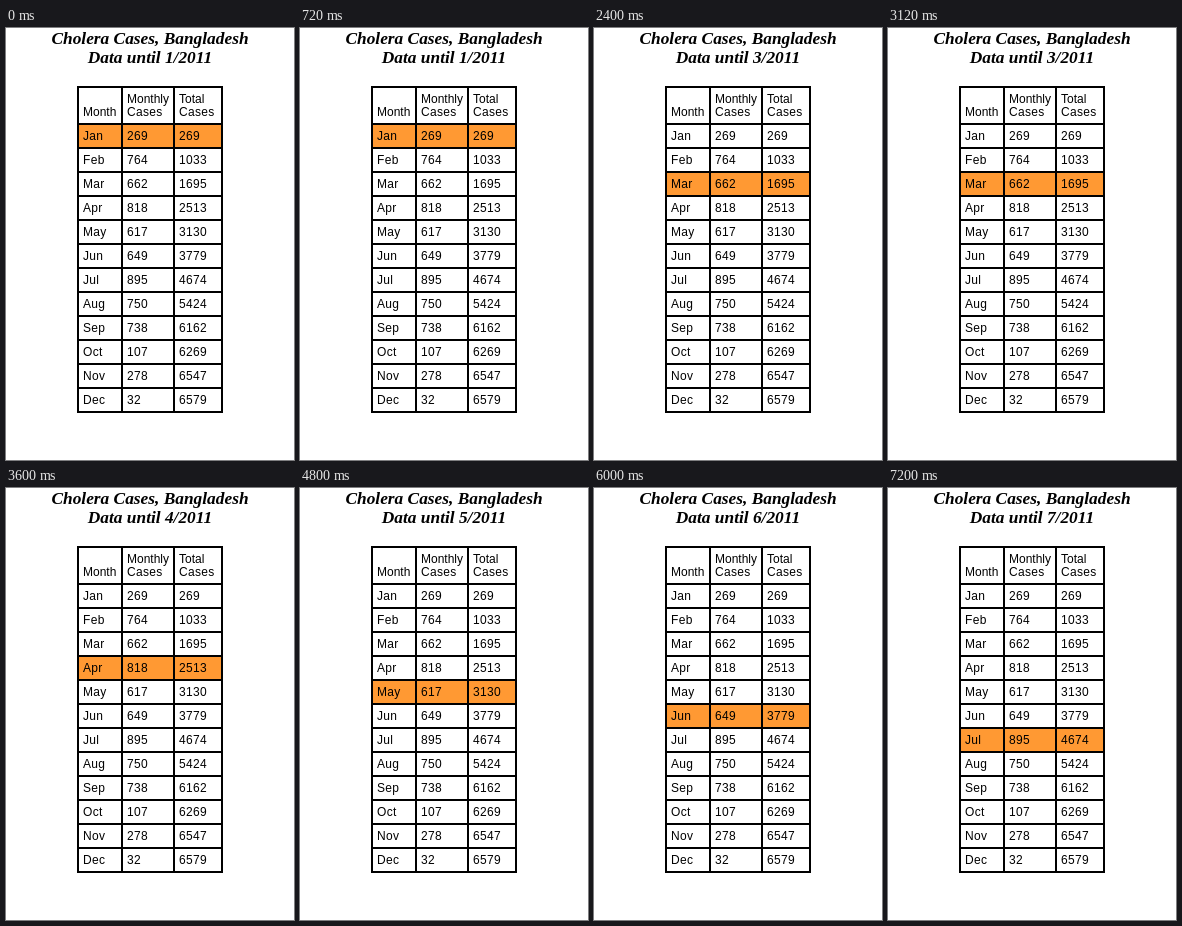
An HTML page that plays this animation: 288x432 px, repeating every 8 s.

```html
<!DOCTYPE html>
<html lang="en">
<head>
<meta charset="utf-8">
<title>Cholera Cases, Bangladesh</title>
<style>
  html, body { margin: 0; width: 100%; height: 100%; overflow: hidden; background: #fff; }
  svg { display: block; width: 100vw; height: 100vh; }
  .title { font: italic bold 17.35px "Liberation Serif", serif; text-anchor: middle; }
  .head { font: 12px "Liberation Sans", sans-serif; }
  .cell { font: 12px "Liberation Sans", sans-serif; letter-spacing: .33px; }
</style>
</head>
<body>
<svg id="stage" viewBox="0 0 288 432"></svg>
<script>
const LOOP = 8000, STEP = 1200;
const ROW_H = 24, FIRST_ROW = 96;
const COLS = [72, 116, 168, 216];
const MONTHS = "Jan Feb Mar Apr May Jun Jul Aug Sep Oct Nov Dec".split(" ");
const CASES = [269, 764, 662, 818, 617, 649, 895, 750, 738, 107, 278, 32];
const stage = document.getElementById("stage");

function add(tag, attrs, content = "") {
  const el = document.createElementNS("http://www.w3.org/2000/svg", tag);
  for (const key in attrs) el.setAttribute(key, attrs[key]);
  el.textContent = content;
  return stage.appendChild(el);
}

function label(x, y, kind, content) {
  return add("text", { x, y, class: kind }, content);
}

const bar = add("rect", { x: 72, width: 144, height: ROW_H, fill: "#ff9933" });

// Grid
const bottom = FIRST_ROW + ROW_H * MONTHS.length;
let grid = COLS.map(x => `M${x} 58V${bottom + 1}`).join("") + "M71 59H217";
for (let y = FIRST_ROW; y <= bottom; y += ROW_H) grid += `M71 ${y}H217`;
add("path", { d: grid, fill: "none", stroke: "#000", "stroke-width": 2, "shape-rendering": "crispEdges" });

// Headings
label(144, 16, "title", "Cholera Cases, Bangladesh");
const period = label(144, 35, "title", "");
label(77, 88, "head", "Month");
label(121, 75, "head", "Monthly");
label(173, 75, "head", "Total");
label(121, 88, "cell", "Cases");
label(173, 88, "cell", "Cases");

// Rows with a running total
let total = 0;
MONTHS.forEach((month, i) => {
  const y = FIRST_ROW + i * ROW_H + 16;
  total += CASES[i];
  [month, CASES[i], total].forEach((value, c) => label(COLS[c] + 5, y, "cell", value));
});

function draw(t) {
  const i = Math.floor(t / STEP);
  bar.setAttribute("y", FIRST_ROW + i * ROW_H);
  period.textContent = `Data until ${i + 1}/2011`;
}

const start = performance.now();
function tick() {
  draw((performance.now() - start) % LOOP);
  requestAnimationFrame(tick);
}
tick();
</script>
</body>
</html>
```
